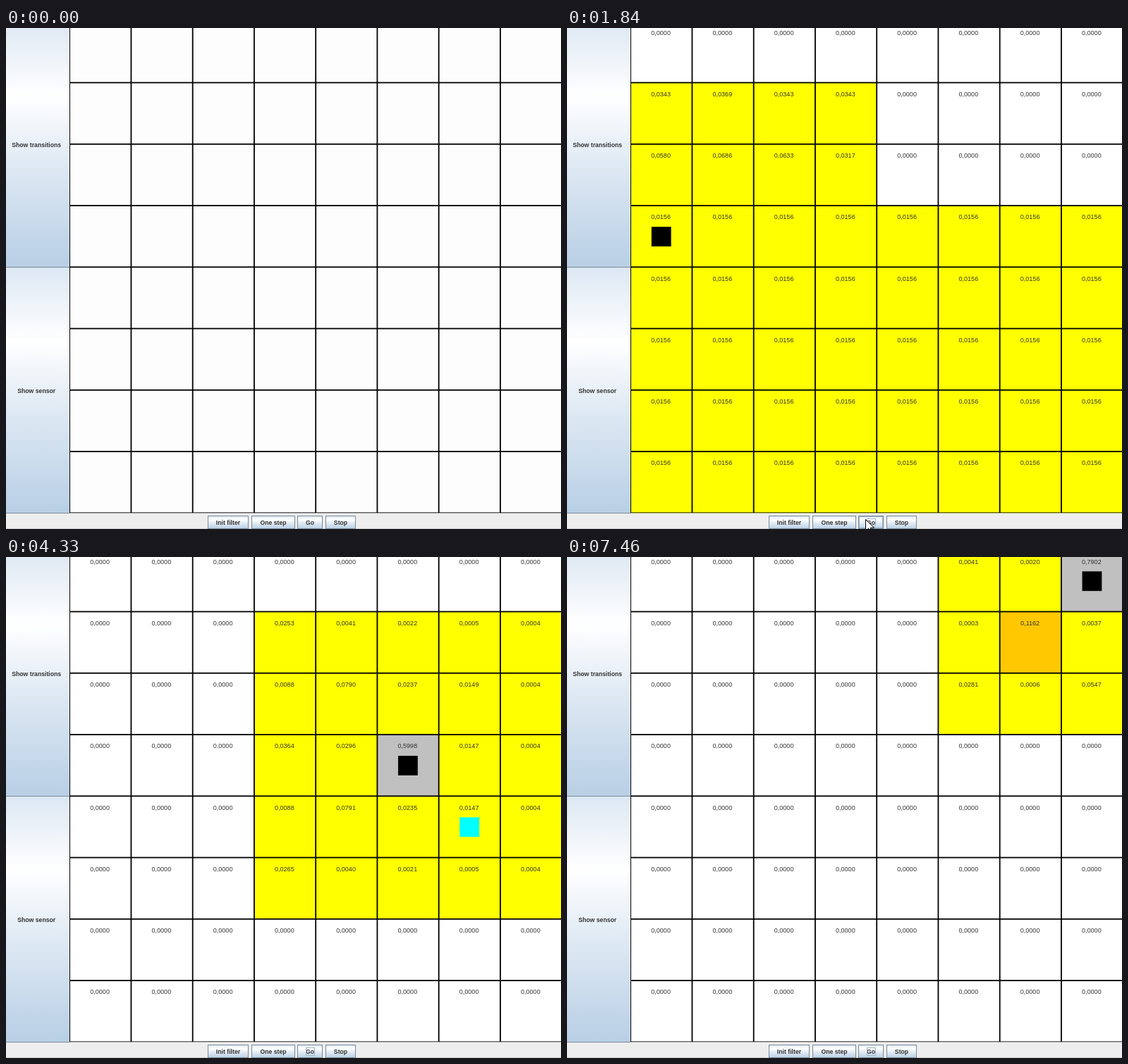
An HTML page with a canvas for the animation above (8 s loop, 787 by 711 pixels).

```html
<!DOCTYPE html>
<html lang="en">
<head>
<meta charset="utf-8">
<title>Grid localization filter</title>
<style>
  html, body { margin: 0; width: 100%; height: 100%; overflow: hidden; background: #eee; }
  canvas { display: block; width: 787px; height: 711px; }
</style>
</head>
<body>
<canvas id="stage" width="787" height="711"></canvas>
<script>
const ctx = document.getElementById('stage').getContext('2d');
const LOOP = 8000, N = 8, PITCH = 87.25, LEFT = 90.2, TOP = -9.7, LINE = 1.8;
const FONT = '"Liberation Sans", Arial, sans-serif';
const lineX = i => LEFT + i * PITCH;
const lineY = i => TOP + i * PITCH;

// Hidden Markov filter over cell and heading (north, east, south, west)
const DIRS = [[0, -1], [1, 0], [0, 1], [-1, 0]];
const inside = (x, y) => x >= 0 && y >= 0 && x < N && y < N;
const at = (x, y) => (y * N + x) * 4;

function eachCell(fn) {
  for (let y = 0; y < N; y++) for (let x = 0; x < N; x++) fn(x, y);
}

function advance(belief, [sx, sy]) {
  const next = new Array(N * N * 4).fill(0);
  eachCell((x, y) => {
    const open = [0, 1, 2, 3].filter(d => inside(x + DIRS[d][0], y + DIRS[d][1]));
    for (let h = 0; h < 4; h++) for (const d of open) {
      const chance = !open.includes(h) ? 1 / open.length
        : d === h ? 0.7 : 0.3 / (open.length - 1);
      next[at(x + DIRS[d][0], y + DIRS[d][1]) + d] += belief[at(x, y) + h] * chance;
    }
  });
  let sum = 0;
  eachCell((x, y) => {
    const ring = Math.max(Math.abs(x - sx), Math.abs(y - sy));
    const weight = ring > 2 ? 0 : 4 / 2 ** ring;
    for (let h = 0; h < 4; h++) sum += next[at(x, y) + h] *= weight;
  });
  return next.map(p => p / sum);
}

function makeStep(belief, robot, reading) {
  const probs = Array.from({ length: N * N }, (_, i) =>
    belief.slice(i * 4, i * 4 + 4).reduce((a, b) => a + b));
  return { belief, probs, robot, reading, best: probs.indexOf(Math.max(...probs)) };
}

// The robot drives east along row 3, then north along the last column
const READINGS = { 2: [3, 3], 4: [4, 4], 5: [6, 4] };
const steps = [makeStep(new Array(N * N * 4).fill(1 / 256), [0, 3])];
for (let k = 1; k <= 10; k++) {
  const robot = [Math.min(k, 7), Math.min(3, 10 - k)];
  steps.push(makeStep(advance(steps[k - 1].belief, robot), robot, READINGS[k]));
}

// Steps come at an even pace; each repaint takes two passes
const INIT = 1060, FIRST = 1790, EVERY = 614, PASS = 80;
const stepStart = k => k ? FIRST + (k - 1) * EVERY : INIT;

function stepAt(t) {
  if (t < FIRST) return t < INIT ? -1 : 0;
  return Math.min(10, 1 + Math.floor((t - FIRST) / EVERY));
}

// Pointer way points (time, x, y), sampled every 75 ms
const WAY = [[220, 441, 701], [360, 436, 701], [910, 325, 697], [1060, 346, 697], [1550, 423, 697]];

function pointerAt(t) {
  if (t < 130) return null;
  if (t < 220) return [472, 702];
  const s = Math.floor((t - 10) / 75) * 75 + 10;
  const i = WAY.findIndex(([time]) => time > s);
  if (i < 0) return WAY[WAY.length - 1].slice(1);
  const a = WAY[Math.max(0, i - 1)], b = WAY[i];
  const u = a === b ? 0 : (s - a[0]) / (b[0] - a[0]);
  return [1, 2].map(n => Math.round(a[n] + (b[n] - a[n]) * u));
}

const BUTTONS = [
  ['Init filter', 286, 344], ['One step', 348, 410], ['Go', 413, 449], ['Stop', 453, 496]
];

function rect(x, y, w, h, color) {
  ctx.fillStyle = color;
  ctx.fillRect(x, y, w, h);
}

function frame(x, y, w, h, color) {
  ctx.strokeStyle = color;
  ctx.lineWidth = 1;
  ctx.strokeRect(x + 0.5, y + 0.5, w - 1, h - 1);
}

function label(text, x, y, size, weight = '', color = '#333') {
  ctx.font = `${weight} ${size}px ${FONT}`;
  ctx.textAlign = 'center';
  ctx.fillStyle = color;
  ctx.fillText(text, x, y);
}

function sheen(y, h) {
  const g = ctx.createLinearGradient(0, y, 0, y + h);
  g.addColorStop(0, '#dde8f3');
  g.addColorStop(0.3, '#fff');
  g.addColorStop(0.6, '#dde8f3');
  g.addColorStop(1, '#b8cfe5');
  return g;
}

function sidePanel() {
  ['Show transitions', 'Show sensor'].forEach((text, i) => {
    const y = -9 + i * 349;
    rect(0, y, 90, 349, sheen(y, 349));
    rect(0, y + 348, 90, 1, '#7a8a99');
    label(text, 43.2, y + 177.6, 8.7, 'bold');
  });
}

function cellColor(p) {
  return p > 0.2 ? '#f00' : p > 0.1 ? '#ffc800' : p > 0 ? '#ff0' : '#fff';
}

function square([x, y], color) {
  rect(lineX(x) + 29.6, lineY(y) + 30.1, 27.8, 27.8, color);
}

function drawCell(x, y, step, marked) {
  const i = y * N + x, p = step.probs[i];
  const fill = marked && i === step.best ? '#c0c0c0' : cellColor(p);
  rect(lineX(x), lineY(y), PITCH + 1, PITCH + 1, fill);
  const ink = fill === '#f00' ? '#7a1a1a' : '#333';
  label(p.toFixed(4).replace('.', ','), lineX(x) + 42.9, lineY(y) + 19.3, 9.05, '', ink);
  if (!marked) return;
  const here = c => c && c[0] === x && c[1] === y;
  if (here(step.reading)) square(step.reading, '#0ff');
  if (here(step.robot)) square(step.robot, '#000');
}

function drawGrid(t) {
  rect(90, 0, 697, 688, '#fdfdfd');
  const k = stepAt(t);
  if (k >= 0) {
    const partial = t < stepStart(k) + PASS;
    eachCell((x, y) => {
      if (partial && k > 0) drawCell(x, y, steps[y < 3 ? k : k - 1], y >= 3);
      else drawCell(x, y, steps[k], true);
    });
    if (partial && k === 0) square([0, 0], '#ff0');
  }
  for (let i = 1; i < N; i++) {
    rect(lineX(i) - LINE / 2, 0, LINE, 688, '#000');
    rect(90, lineY(i) - LINE / 2, 697, LINE, '#000');
  }
  rect(90, 0, 1, 688, '#000');
  rect(90, 687.4, 697, 1.1, '#000');
}

function drawButton([text, x0, x1], hover, focus, pressed) {
  const w = x1 - x0, mid = (x0 + x1) / 2;
  rect(x0, 692, w, 19, pressed ? '#b8cfe5' : sheen(692, 19));
  if (hover) frame(x0 + 1, 693, w - 2, 17, '#9fb6cf');
  frame(x0, 692, w, 19, '#7a8a99');
  label(text, mid, 705.2, 8.7, 'bold');
  if (focus) {
    const tw = Math.round(ctx.measureText(text).width) + 1;
    frame(Math.round(mid - tw / 2), 696, tw, 12, '#a3b8cc');
  }
}

function drawPointer([x, y]) {
  const arrow = new Path2D('M0 0V16L4 12.5L7 18.5L9 17.5L6.5 11.8H12Z');
  ctx.save();
  ctx.translate(x + 0.5, y + 0.5);
  ctx.fillStyle = '#fff';
  ctx.fill(arrow);
  ctx.strokeStyle = '#000';
  ctx.lineWidth = 1;
  ctx.stroke(arrow);
  ctx.restore();
}

function drawToolbar(t) {
  rect(0, 688.5, 787, 22.5, '#eee');
  rect(0, 688, 90, 1, '#7a8a99');
  rect(0, 710, 787, 1, '#ccc');
  const tip = pointerAt(t);
  const hoverX = tip && t < 2410 ? tip[0] - 4 : -1;
  const focus = t >= 1700 ? 'Go' : t >= 910 ? 'Init filter' : '';
  const pressed = (t >= 910 && t < INIT) || (t >= 1700 && t < FIRST);
  for (const b of BUTTONS) {
    const active = b[0] === focus;
    drawButton(b, hoverX >= b[1] && hoverX < b[2], active, active && pressed);
  }
  if (tip && t < 2270) drawPointer(tip);
}

const began = performance.now();
function tick() {
  const t = (performance.now() - began) % LOOP;
  sidePanel();
  drawGrid(t);
  drawToolbar(t);
  requestAnimationFrame(tick);
}
tick();
</script>
</body>
</html>
```
